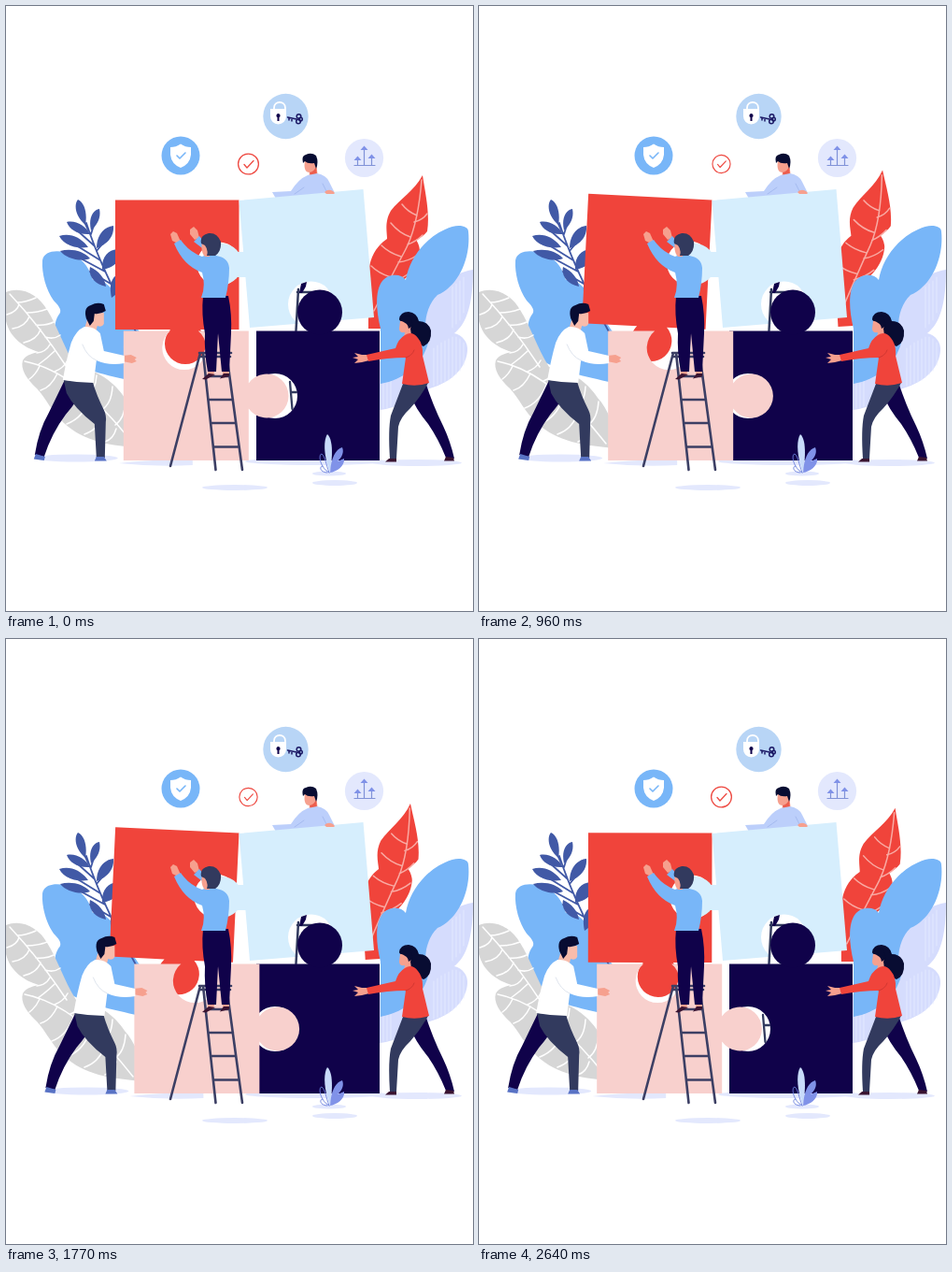
Recreate the animation shown at these times as an HTML page. Size 500 by 647 pixels, loop 2670 ms.

```html
<!DOCTYPE html>
<html lang="en">
<head>
<meta charset="utf-8">
<title>Puzzle teamwork</title>
<style>
html, body { margin: 0; height: 100%; overflow: hidden; background: #fff; }
svg { display: block; width: 100%; height: 100%; }
.line { fill: none; stroke-linecap: round; stroke-linejoin: round; }
.navy { fill: #10024a; } .slate { fill: #323a5e; } .red { fill: #f0443b; }
.blue { fill: #78b6f8; } .pale { fill: #d6eefd; } .pink { fill: #f8d0cd; }
.skin { fill: #f6a08e; } .mist { fill: #e3e8fd; } .white { fill: #fff; }
.gray { fill: #d6d6d6; } .indigo { fill: #4159a6; } .lilac { fill: #d5dcfd; }
.shirt { fill: #bccffb; } .peri { fill: #8092e8; } .hair { fill: #080c32; }
</style>
</head>
<body>
<svg viewBox="0 0 500 647">
  <!-- ground shadows -->
  <g class="mist">
    <ellipse cx="245" cy="515" rx="35" ry="3"/>
    <ellipse cx="352" cy="510" rx="24" ry="3"/>
    <ellipse cx="346" cy="500" rx="18" ry="2.500"/>
    <ellipse cx="440" cy="488.500" rx="48" ry="3.500"/>
    <ellipse cx="332" cy="487" rx="76" ry="4"/>
  </g>

  <!-- left foliage -->
  <path class="blue" d="M39 272C41 261 57 260 71 266C85 272 90 283 93 293C105 291 116 303 122 317L144 350V403C112 396 84 390 66 378C53 367 48 344 56 331C61 326 57 321 51 315C43 304 38 286 39 272Z"/>
  <g class="indigo">
    <path class="line" stroke="#4159a6" stroke-width="1.800" d="M86 232Q102 282 140 350M88 240L80 222M91 244L96 228M94 256L75 239M97 262L110 246M101 272L72 254M105 280L116 268M106 284L80 270M112 297L90 284"/>
    <path d="M85 234C75 226 72 213 77 207C85 211 87 223 85 234ZM91 240C88 227 93 218 100 217C102 226 98 234 91 240ZM90 244C77 245 68 239 65 231C75 229 85 235 90 244ZM97 259C97 245 105 236 115 235C116 247 108 255 97 259ZM88 258C76 260 62 256 57 246C69 242 81 248 88 258ZM103 282C102 269 109 261 119 260V274C114 279 109 281 103 282ZM90 270C80 274 64 270 58 262C70 259 83 262 90 270ZM107 300C93 297 88 287 90 279C99 283 106 291 107 300ZM113 312C110 298 113 290 121 286V306Z"/>
  </g>
  <path class="gray" d="M0 306C17 299 35 309 44 325C55 342 61 363 75 386C98 389 116 402 127 419C139 432 145 450 147 473C111 470 84 466 62 446C48 433 44 421 33 409C22 399 15 388 18 379C21 373 30 371 35 370C18 365 4 354 0 337Z"/>
  <path class="line" stroke="#fff" stroke-width="1.500" d="M4 308Q36 342 65 386M12 317Q21 317 32 312M22 328Q34 328 44 324M32 341Q43 342 51 338M42 354Q51 357 58 352M14 319Q12 327 1 330M25 332Q21 343 7 345M37 346Q33 357 19 360M47 362Q43 370 33 371M20 380Q76 391 136 468M34 384Q44 377 52 369M52 391Q62 387 66 379M69 401Q78 398 82 388M87 417Q96 411 97 395M102 432Q113 426 114 407M117 448Q127 441 128 423M36 385Q32 394 25 399M55 393Q48 408 37 411M72 405Q65 424 49 430M89 421Q83 440 65 447M105 437Q99 453 84 458M118 452Q115 463 106 466"/>

  <!-- right foliage -->
  <path class="lilac" d="M500 282C477 285 455 306 444 335L391 390V433C413 432 431 424 445 411C469 407 492 392 494 369C495 360 489 352 480 350C494 339 500 317 500 282Z"/>
  <path class="line" stroke="#e8ecff" stroke-width=".8" d="M458 366V406M462 363V405M466 360V403M470 358V402M474 356V400M478 354V397M482 354V394M486 356V390M490 360V384M404 400V430M408 398V430M412 397V428M478 300V344M482 297V340M486 294V336M490 290V328"/>
  <g id="leaf">
    <path class="red" d="M446 181C437 198 422 206 412 219C405 231 408 242 408 249C396 257 389 270 388 287V345H404L413 301C429 294 441 279 443 263C443 257 441 253 439 250C444 248 448 245 451 241C454 221 449 201 446 181Z"/>
    <path class="line" stroke="#f9aaa3" stroke-width="1.500" d="M445 186Q441 236 427 262T394 326M440 224Q430 220 424 212M433 247Q421 243 412 232M423 268Q410 264 402 256M412 290Q399 286 391 278M437 231Q446 229 451 222M430 255Q439 252 446 245M420 274Q431 273 441 266M408 296Q420 294 430 287"/>
  </g>
  <path class="blue" d="M495 241C495 235 483 232 470 239C448 249 432 270 428 293C423 286 410 286 403 294C395 304 396 325 401 345V404C425 400 446 384 452 360C446 344 449 321 462 309C484 300 498 270 495 241Z"/>

  <!-- icons -->
  <circle class="blue" cx="187" cy="160" r="20.500"/>
  <path class="white" d="M187 147.500Q192 151 198 151V159Q197 169 187 173Q177 169 176 159V151Q182 151 187 147.500Z"/>
  <path class="line" stroke="#78b6f8" stroke-width="1.600" d="M183 160L186 163L192 157"/>

  <circle cx="299.500" cy="118" r="24.200" fill="#b8d5f6"/>
  <path class="line" stroke="#fff" stroke-width="1.800" d="M287 112V109C287 101 299 101 299 109V112"/>
  <path class="white" d="M283 110H300V118A8.500 8.500 0 0 1 283 118Z"/>
  <path class="navy" d="M291.500 115a2.200 2.200 0 0 1 1 4.100V123h-2v-3.900a2.200 2.200 0 0 1 1-4.100Z"/>
  <g class="line" stroke="#1c1a66" stroke-width="1.500">
    <path d="M301.500 119L311 121M303 119.500V122M306 120V123"/>
    <circle cx="313" cy="123.500" r="2.300"/><circle cx="313.500" cy="118" r="2.300"/><circle cx="315.500" cy="121" r="1.800"/>
  </g>

  <circle class="mist" cx="383.500" cy="162.500" r="20.600"/>
  <path class="line" stroke="#8092d8" stroke-width="1.200" d="M373 170.500H395M376.500 170V164M383.500 170V152M391.500 170V162"/>
  <path class="peri" d="M372.500 165L376.500 160.500L380.500 165ZM379.500 154L383.500 149.500L387.500 154ZM387.500 163L391.500 158.500L395.500 163Z"/>

  <g id="check" class="line" stroke="#ee4a42" stroke-width="1.300">
    <circle r="10.900"/><path d="M-4.500 .5L-1.500 4L5.500 -3.500"/>
  </g>

  <!-- man behind the wall -->
  <path class="skin" d="M320 165Q318 178 325 178L324 184H334L332 166Z"/>
  <path fill="#ed5d4d" d="M325 178Q330 177 332 172L333 181H326Z"/>
  <path class="hair" d="M318 168Q316 160 321 159Q327 156 332 160Q335 167 332 174L330 168Q323 169 320 166Z"/>
  <path class="shirt" d="M285 199L305 198Q313 185 323 181L333 179Q343 181 346 188L352 200V206H289Z"/>
  <path class="line" stroke="#9fb5ec" stroke-width=".8" d="M319 194L309 201M339 190L343 198"/>

  <!-- puzzle pieces -->
  <g id="redPiece">
    <path class="red" d="M117 207.500H249.500V346H208A22 22 0 1 1 176 346H117Z"/>
    <circle class="white" cx="228" cy="276" r="23.500"/>
  </g>
  <path class="pale" d="M249.500 208L382.500 196L394 333L261 344Z"/>
  <circle class="pale" cx="231" cy="276" r="22"/>
  <path class="pale" d="M240 263H257V290H240Z"/>
  <path class="skin" d="M341 199Q345 195 350 198Q353 200 351 201L343 201Z"/>
  <circle class="white" cx="326.500" cy="319" r="24.500"/>
  <path class="line" stroke="#323a5e" stroke-width="2.500" d="M310.500 347L313 303M312 306H337"/>
  <path class="navy" d="M314 307L316 297L322 295L321 300L317 307Z"/>
  <path class="navy" d="M268 347.500H400V486H268Z"/>
  <circle class="navy" cx="336" cy="327.500" r="24"/>
  <circle class="white" cx="288" cy="417" r="24"/>
  <path class="line" stroke="#323a5e" stroke-width="2.300" d="M304 402L306.500 431M305 413H311"/>

  <!-- pushed piece and the man pushing it -->
  <g id="push">
    <ellipse class="mist" cx="75" cy="483.500" rx="45" ry="4"/>
    <path class="mist" d="M121 489Q160 484 200 486V491Q160 493 121 489Z"/>
    <path class="pink" d="M126 347.500H176A23.500 23.500 0 1 0 206 347.500H260V403.500A23.500 23.500 0 1 1 260 430.500V486H126Z"/>
    <path class="navy" d="M63 400L83 409Q77 422 64 437Q49 457 41 482L31 480Q35 454 46 435Z"/>
    <path class="slate" d="M62 400L93 402Q97 416 105 432Q108 438 107 445L106 483H97L95 447Q73 430 65 414Z"/>
    <path fill="#5973c5" d="M32 479L42 482L41 486L30 484.500ZM97 482H105L108 486.500H95Z"/>
    <path class="skin" d="M125 374L134 373L140 376L138 378L140 380L135 382L125 380Z"/>
    <path fill="#f8bcab" d="M89 329L105 328L105 340Q103 344 98 342L96 349L84 346Z"/>
    <path class="hair" d="M86 334Q83 322 91 320Q98 316 105 319L107 326Q101 330 95 329L94 337L90 342Z"/>
    <path class="white" d="M84 343Q94 342 101 350L105 369L127 374V382Q110 385 97 379L94 403Q78 403 61 400Q65 377 70 360Q75 347 84 343Z"/>
    <path class="line" stroke="#dfe5ee" stroke-width="1" d="M82 362Q87 375 97 379"/>
  </g>

  <!-- small plant -->
  <path fill="#c8dbfa" d="M347 499C341 484 339 466 344 458C350 463 350 480 347 499Z"/>
  <path class="peri" d="M347 499C348 483 353 474 360 472C363 479 357 485 355 487L362 484C363 492 354 498 347 499Z"/>
  <path class="line" stroke="#6d82dd" stroke-width=".9" d="M346 499C336 494 334 479 338 479C342 482 342 489 346 499M344 499C336 499 335 492 339 492"/>

  <!-- woman -->
  <path class="navy" d="M432 404L449 402Q457 427 468 449Q476 466 480 484L471 483Q463 463 452 447Q438 430 434 418Z"/>
  <path class="slate" d="M425 404L452 403Q444 418 433 430Q422 440 420 450L418 484H411Q409 453 412 438Z"/>
  <path fill="#3a1431" d="M410 484H418V487.500H406ZM471 482L479 483L480 486.500H469Z"/>
  <path class="skin" d="M388 373L381 373L373 371L377 375L371 376L377 378L373 382L381 381L389 379Z"/>
  <path class="hair" d="M421 335Q422 327 431 327Q440 328 442 337Q452 337 455 347Q456 360 447 364Q438 361 434 351Z"/>
  <path class="skin" d="M422 337L432 335Q436 339 433 345L434 352L426 354L427 349Q421 350 421 345Z"/>
  <path class="hair" d="M421 336Q425 330 433 332L436 342L431 345Q431 339 421 336Z"/>
  <path class="red" d="M427 352Q435 347 441 355Q447 362 446 374L453 403Q439 408 424 404L428 376Q409 376 388 380L386 373L417 366Q420 356 427 352Z"/>
  <path class="line" stroke="#c93430" stroke-width=".8" d="M428 376Q435 374 437 368"/>

  <!-- ladder and climber -->
  <path class="line" stroke="#3c3f64" stroke-width="2.600" d="M208 371L176 492M211 371L224.500 496M236 371L253 496M207 371H241M207 375H240M213.500 396H239.500M216.500 421H243M219 446H246M222 471.500H249.500"/>
  <path class="skin" d="M217 388H224L222 395L215 397ZM231 388H239L239 395L233 396Z"/>
  <path fill="#3a1431" d="M217 393L224 394L214 399.500L210 399ZM233 393H239L239 396L229 398.500Z"/>
  <path class="navy" d="M211 310H238Q242 329 241 350L239 391H231L227 350L225 391H216Q212 370 213 350Q209 329 211 310Z"/>
  <path class="skin" d="M184 254L178 251L176 244L179 241L183 243L187 252ZM202 250L197 244L197 239L201 236L205 240L207 248Z"/>
  <path class="blue" d="M180 254L187 250Q196 263 210 268L218 265L201 252L207 246L225 267Q238 269 239 280Q239 296 235 312H209Q214 300 210 285Q190 278 180 254Z"/>
  <path class="skin" d="M210 252L216 250L218 268H213Q208 263 210 252Z"/>
  <path class="slate" d="M209 254Q207 245 217 243Q226 242 230 252Q231 262 224 267H215Q217 261 213 256Z"/>
</svg>
<script>
const LOOP = 2670;
const part = id => document.getElementById(id);
const [leaf, check, redPiece, push] = ['leaf', 'check', 'redPiece', 'push'].map(part);
const move = (el, transform) => el.setAttribute('transform', transform);

function draw() {
  // linear there-and-back: 0 -> 1 -> 0
  const k = 1 - Math.abs(1 - (performance.now() % LOOP) / LOOP * 2);
  move(push, `translate(${17.2 * k - 0.2} 0)`);
  move(redPiece, `rotate(${4 * k} 249.5 207.5)`);
  move(leaf, `rotate(${-5 * k} 353 400)`);
  move(check, `translate(259.500 169) scale(${1 - 0.17 * k})`);
  requestAnimationFrame(draw);
}
draw();
</script>
</body>
</html>
```
